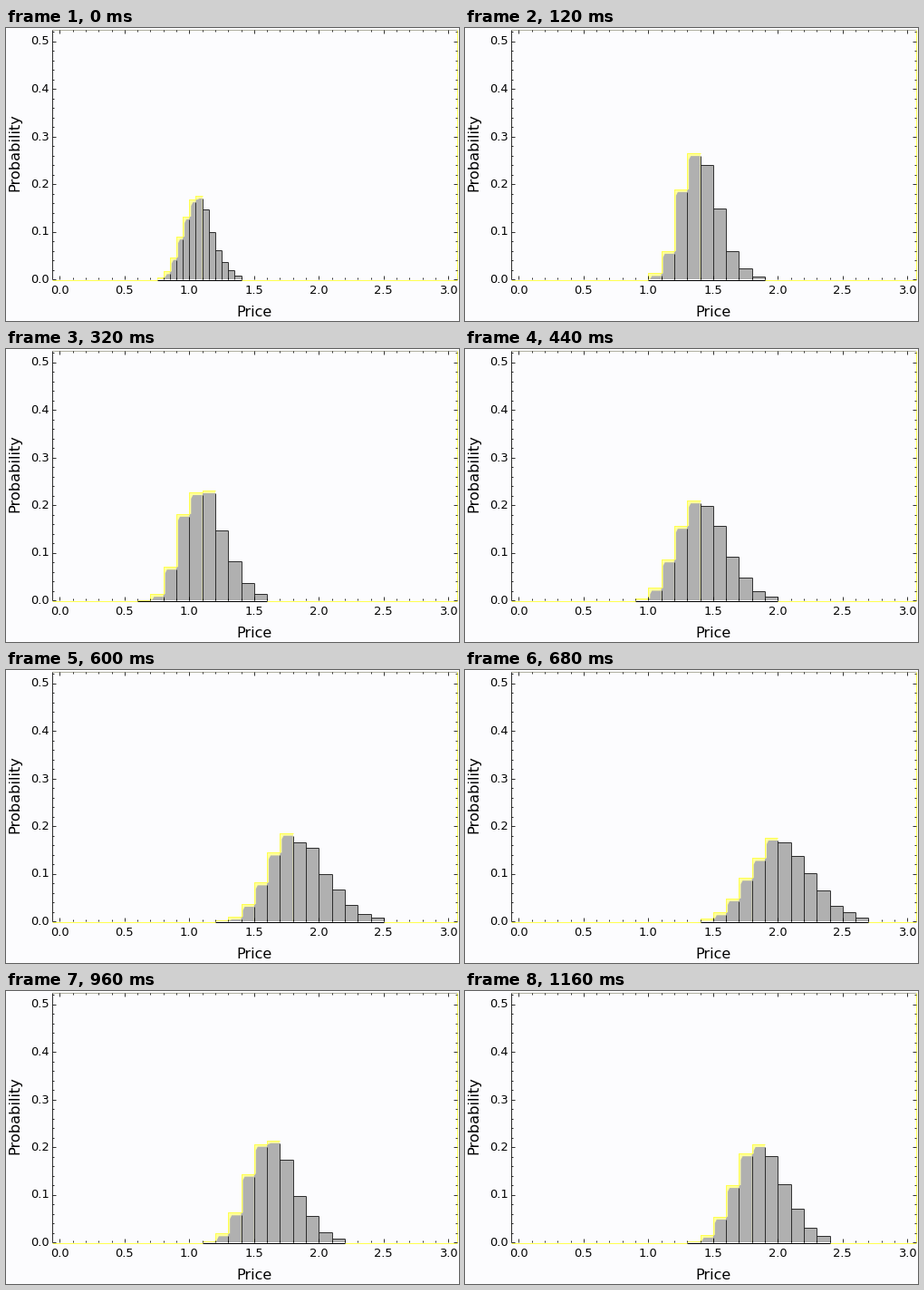
A matplotlib script for the animation above (1.2 s loop, 500 by 323 pixels).

```python
import numpy as np
import matplotlib.pyplot as plt
from matplotlib.animation import FuncAnimation
from matplotlib.collections import LineCollection, PolyCollection

WIDTH, HEIGHT, DPI = 500, 323, 100
FRAMES, INTERVAL = 30, 40
LEFT, RIGHT, TOP, BOTTOM = 50.5, 497.5, 1.5, 277
PAPER, GRAY, PALE, YELLOW = "#fcfcfe", "#b0b0b0", "#ffff9c", "#ffff50"
PX = 72 / DPI

# Turning points of the price path: step, mean, spread
PATH = np.array([
    (0, 1.07, 0.12), (3, 1.40, 0.15), (8, 1.11, 0.165), (15, 1.84, 0.22),
    (20, 2.32, 0.265), (24, 1.64, 0.185), (29, 1.87, 0.195)])


def px(price):
    return 59.3 + 143 * price


def py(probability):
    return BOTTOM - 525 * probability


def histogram(step):
    """Log-normal price distribution with a little sampling noise."""
    mean, spread = (np.interp(step, PATH[:, 0], PATH[:, k]) for k in (1, 2))
    width = 0.05 if spread < 0.14 else 0.1 if spread < 0.24 else 0.2
    first = np.floor((mean - 2.5 * spread) / width)
    last = np.ceil((mean + 2.7 * spread) / width)
    edges = np.arange(first, last) * width
    prices = edges + width / 2
    sigma = spread / mean
    z = (np.log(prices / mean) + sigma**2 / 2) / sigma
    probs = np.exp(-z**2 / 2) / prices
    noise = np.random.default_rng(step).standard_normal(len(probs))
    probs *= 1 + 0.05 * noise
    return edges, width, probs / probs.sum()


fig = plt.figure(figsize=(WIDTH / DPI, HEIGHT / DPI), dpi=DPI, facecolor=PAPER)
ax = fig.add_axes([0, 0, 1, 1])
ax.set_xlim(0, WIDTH)
ax.set_ylim(HEIGHT, 0)
ax.axis("off")


def segments(color, width=1.0, order=3, lines=()):
    art = LineCollection(lines, colors=color, linewidths=width * PX, zorder=order)
    ax.add_collection(art, autolim=False)
    return art


def polygons(color, order):
    art = PolyCollection([], facecolors=color, edgecolors="none", zorder=order)
    ax.add_collection(art, autolim=False)
    return art


def label(x, y, text, size, **options):
    ax.text(x, y, text, fontsize=size * PX, family="DejaVu Sans",
            color="black", **{"ha": "center", "va": "baseline", **options})


def draw_frame():
    segments("#303030", 1, 5, [[(LEFT, TOP), (LEFT, BOTTOM)]])
    segments("#b0b0a0", 1, 4, [[(LEFT, TOP), (RIGHT, TOP)]])
    segments(YELLOW, 1, 4, [[(LEFT, BOTTOM + 0.5), (RIGHT, BOTTOM + 0.5)],
                            [(RIGHT, TOP), (RIGHT, BOTTOM)]])
    ticks = []
    for i in range(31):
        x, size = px(i / 10), 4 if i % 5 == 0 else 2
        ticks += [[(x, BOTTOM), (x, BOTTOM - size)], [(x, TOP), (x, TOP + size)]]
        if i % 5 == 0:
            label(x, 293, f"{i / 10:.1f}", 13)
    for i in range(27):
        y, size = py(i / 50), 4 if i % 5 == 0 else 2
        ticks += [[(LEFT, y), (LEFT + size, y)], [(RIGHT, y), (RIGHT - size, y)]]
        if i % 5 == 0:
            label(47.7, y + 4, f"{i / 50:.1f}", 13, ha="right")
    segments("black", 0.8, 5, ticks)
    label(273.5, 318, "Price", 16)
    label(10, 137.5, "Probability", 16.3, rotation=90, va="center")


draw_frame()
halo, bars = polygons(PALE, 1), polygons(GRAY, 2)
dark, bright = segments("#202020", 0.9, 4), segments(YELLOW, 1, 3)
base = segments("black", 1, 6)


def update(step):
    edges, width, probs = histogram(step)
    peak = np.argmax(probs)
    pale, gray, black, yellow = [], [], [], []
    previous = BOTTOM
    for i, (edge, prob) in enumerate(zip(edges, probs)):
        x0, x1 = px(edge), min(px(edge + width), RIGHT)
        if x0 >= RIGHT:
            break
        y = crown = py(prob)
        if i <= peak:
            # Light falls on the rising side, so the gray body sits back there.
            crown = min(y + 3, BOTTOM)
            foot = max(previous, crown)
            shoulder = min(y + 7, foot)
            pale.append([(x0, BOTTOM), (x0, y), (x1, y), (x1, BOTTOM)])
            gray.append([(x0, BOTTOM), (x0, foot), (x0 + 2, foot),
                         (x0 + 2, shoulder), (x0 + 4, crown),
                         (x1, crown), (x1, BOTTOM)])
            yellow.append([(x0, previous), (x0, y), (x1, y)])
        else:
            gray.append([(x0, BOTTOM), (x0, y), (x1, y), (x1, BOTTOM)])
            black.append([(x0, y), (x1, y)])
        if x1 < RIGHT:
            black.append([(x1, BOTTOM), (x1, crown)])
        previous = y
    halo.set_verts(pale)
    bars.set_verts(gray)
    dark.set_segments(black)
    bright.set_segments(yellow)
    end = min(px(edges[-1] + width), RIGHT)
    base.set_segments([[(px(edges[0]), BOTTOM + 0.5), (end, BOTTOM + 0.5)]])
    return halo, bars, dark, bright, base


animation = FuncAnimation(fig, update, frames=FRAMES, interval=INTERVAL,
                          repeat=True, repeat_delay=0, init_func=lambda: update(0))
plt.show()
```
